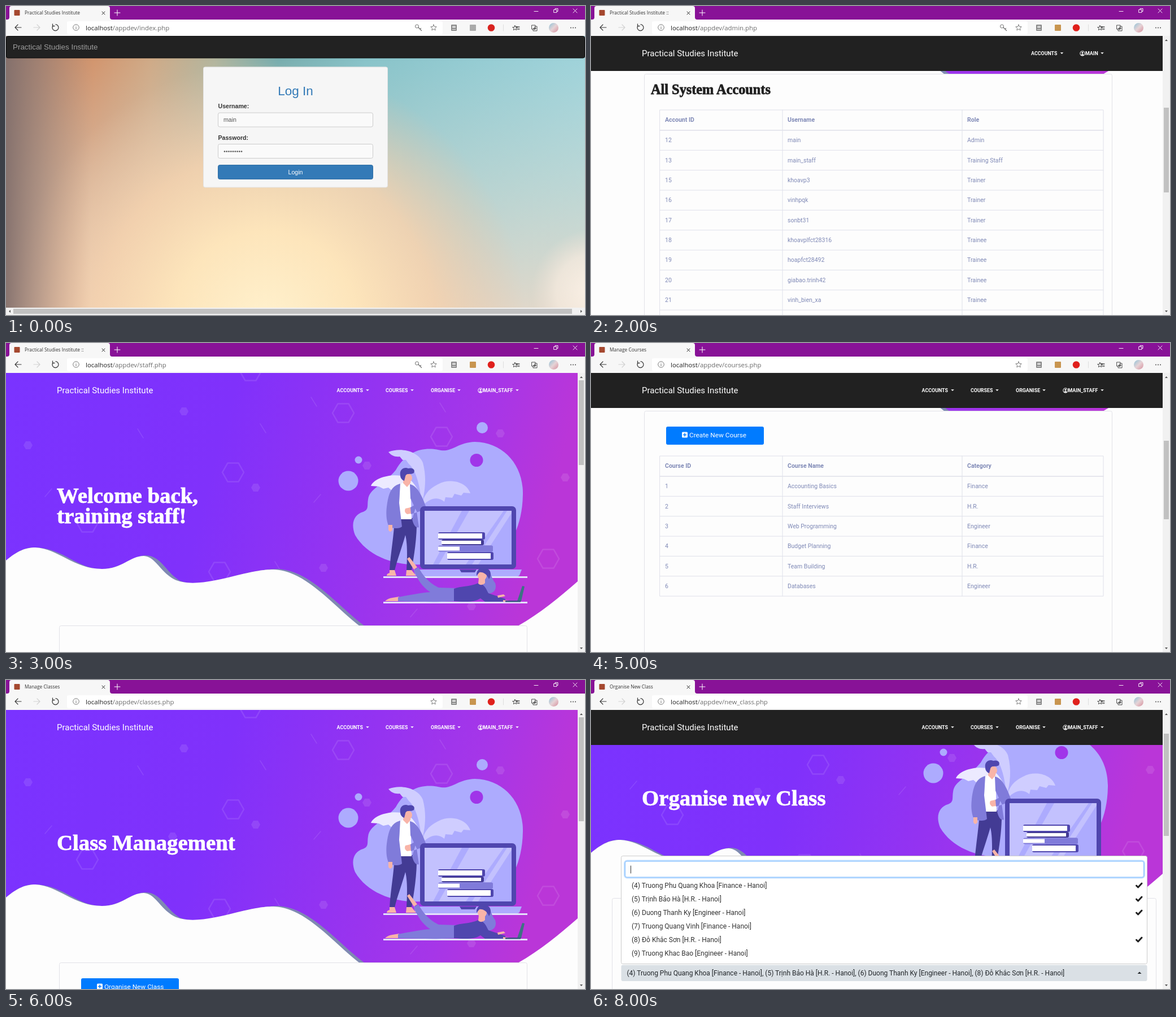
Animation of 1025x547 px, one loop 9000 ms. Source, as an HTML page:

```html
<!DOCTYPE html>
<html lang="en">
<head>
<meta charset="utf-8">
<title>Training portal tour</title>
<style>
  html, body { margin: 0; width: 100%; height: 100%; overflow: hidden; background: #fdfdfd; }
  svg { display: block; width: 100vw; height: 100vh; }
  text { white-space: pre; font-family: Roboto, sans-serif; }
  .ui { font-family: "Open Sans", "Noto Sans", sans-serif; }
  .arial { font-family: "Liberation Sans", Arial, sans-serif; }
  .serif { font-family: "Liberation Serif", serif; font-weight: 700; stroke-width: .8; }
  .bold { font-weight: 700; }
  .mid { text-anchor: middle; }
  .line { fill: none; stroke-linecap: round; stroke-linejoin: round; }
  .scene { opacity: 0; }
</style>
</head>
<body>
<svg id="stage" viewBox="0 0 1025 547" preserveAspectRatio="none"></svg>
<script>
const STEP = 1000;
const BRAND = 'Practical Studies Institute';

const rect = (x, y, w, h, fill, more = '') =>
  `<rect x="${x}" y="${y}" width="${w}" height="${h}" fill="${fill}" ${more}/>`;
const disc = (x, y, r, fill, more = '') => `<circle cx="${x}" cy="${y}" r="${r}" fill="${fill}" ${more}/>`;
const shape = (d, fill) => `<path d="${d}" fill="${fill}"/>`;
const line = (d, color, width = 1) => `<path class="line" d="${d}" stroke="${color}" stroke-width="${width}"/>`;
const text = (x, y, size, str, fill, cls = '') =>
  `<text x="${x}" y="${y}" font-size="${size}" fill="${fill}" class="${cls}">${str}</text>`;
const serif = (x, y, size, str, fill) =>
  `<text x="${x}" y="${y}" font-size="${size}" fill="${fill}" stroke="${fill}" class="serif">${str}</text>`;
const stops = list => list.map(([at, color, alpha = 1]) =>
  `<stop offset="${at}" stop-color="${color}" stop-opacity="${alpha}"/>`).join('');
const each = (list, fn) => list.map(fn).join('');

// Browser window
function chrome(title, url, { key = false, login = false } = {}) {
  const ink = '#3b3b3b', soft = '#707070';
  return rect(0, 0, 1025, 24, '#881297')
    + shape('M2 24Q6 24 6 20V4Q6 0 10 0H180Q184 0 184 4V20Q184 24 188 24Z', '#f7f7f7')
    + rect(14.5, 7, 10, 10, '#a5482f', 'rx="1"')
    + text(33, 15.3, 8.4, title, '#333', 'ui')
    + line('M170 10l5 5M175 10l-5 5', '#222')
    + line('M192 12h10M197 7v10', '#fff')
    + line('M935 9.5h7M970 6.5h5v5h-5zM972 6V4.500h5v5h-2M1004 5l7 7M1011 5l-7 7', '#fff', .9)
    + rect(0, 24, 1025, 29, '#f7f7f7')
    + rect(108, 27, 665, 23, '#fff', 'rx="3"')
    + line('M27 38H16M21 33l-5 5 5 5', ink, 1.2)
    + line('M49 38H60M55 33l5 5-5 5', '#d2d2d2', 1.2)
    + line('M83 35A5.500 5.500 0 1 0 88 32.700M82.500 32v3.500h3.500', ink, 1.3)
    + disc(124, 38, 5.3, 'none', `stroke="${soft}" stroke-width=".9"`)
    + line('M124 37.500v3M124 35.300v.1', soft)
    + `<text x="141" y="42.500" font-size="11.400" class="ui" fill="#222">localhost<tspan fill="#6c6c6c">/appdev/${url}</tspan></text>`
    + (key ? disc(727.5, 36, 3, 'none', `stroke="${soft}"`) + line('M730 38l5.500 5.500M733 41l1.500-1.500', soft, 1.3) : '')
    + line(star(757, 38.5, 5.5), soft, .9)
    + rect(788, 33, 10, 11, '#888', 'rx="1"') + rect(790, 35, 6, 4, '#cfcfcf') + line('M790 41.500h6', '#eee')
    + rect(821, 33, 11, 11, login ? '#aaa' : '#c8954f', 'rx="1"')
    + disc(859, 38.5, 6.3, login ? '#d9231f' : '#e0201c')
    + line('M880.500 33v11', '#ddd')
    + line(star(901, 39, 4.5), ink, .9) + line('M903 36.500h6M904 39h5M905 41.500h4', ink)
    + line('M931 34h6v7h-6zM933 41v3h7v-8h-3M936 37v5M933.500 39.500h5', ink, .9)
    + disc(969.5, 38.5, 8.5, 'url(#avatar)')
    + each([1000, 1004, 1008], x => disc(x, 38.5, .9, ink));
}

function star(x, y, r) {
  const points = Array.from({ length: 10 }, (_, i) => {
    const a = i * Math.PI / 5, d = i % 2 ? r * .45 : r;
    return `${(x + d * Math.sin(a)).toFixed(1)} ${(y - d * Math.cos(a)).toFixed(1)}`;
  });
  return `M${points.join('L')}Z`;
}

const scrollbar = (top, height) =>
  rect(1012, 53, 13, 494, '#f1f1f1') + rect(1014, top, 9, height, '#c1c1c1')
  + shape('M1016 62h5l-2.500-3zM1016 539h5l-2.500 3z', '#555');

// Log-in page
function loginScene() {
  const field = y => rect(375.5, y, 274, 25, '#fafafa', 'rx="3" stroke="#ccc"');
  return rect(0, 53, 1025, 494, 'url(#sky)')
    + rect(0, 92, 1025, 442, 'url(#haze)') + rect(0, 92, 1025, 442, 'url(#glow)')
    + rect(0, 92, 150, 442, 'url(#shade)') + rect(0, 92, 1025, 442, 'url(#flare)')
    + rect(.5, 53.5, 1024, 38.5, '#222', 'rx="3" stroke="#080808"')
    + text(12, 77, 13.4, BRAND, '#9d9d9d', 'arial')
    + rect(349.5, 108, 326, 213, '#f6f6f6', 'rx="3" stroke="#e3e3e3"')
    + text(512.5, 157.5, 22.5, 'Log In', '#337ab7', 'arial mid')
    + text(375.5, 181, 10.6, 'Username:', '#333', 'arial bold') + field(189)
    + text(385, 205, 10.6, 'main', '#555', 'arial')
    + text(375.5, 236.5, 10.6, 'Password:', '#333', 'arial bold') + field(244.5)
    + each([...Array(9).keys()], i => disc(387 + i * 3.75, 257.5, 1.35, '#555'))
    + rect(375.5, 281.5, 274, 25, '#337ab7', 'rx="3" stroke="#2e6da4"')
    + text(512.5, 297.7, 10.6, 'Login', '#fff', 'arial mid')
    + rect(0, 534, 1025, 13, '#f1f1f1') + rect(13, 536, 989, 9, '#c1c1c1')
    + shape('M8 538v5l-3-2.500zM1017 538v5l3-2.500z', '#555')
    + chrome(BRAND, 'index.php', { key: true, login: true });
}

// Hero banner
const hex = (x, y, r) => `M${x - r} ${y}l${r / 2} ${-r * .87}h${r}l${r / 2} ${r * .87}l${-r / 2} ${r * .87}h${-r}z`;

function decor() {
  const rings = [[597, 124], [771, 166], [402, 229], [144, 318], [960, 382], [378, 405], [433, 50]];
  const dots = [[315, 121], [39, 181], [875, 160], [990, 238], [442, 256], [295, 277], [562, 398], [824, 466], [639, 217]];
  const falling = [[545, 104], [773, 114], [238, 160], [455, 151], [481, 395]];
  const rising = [[75, 265], [551, 275], [722, 478]];
  return '<g opacity=".1">'
    + each(rings, ([x, y]) => line(hex(x, y, 19), '#fff', 2.5))
    + each(dots, ([x, y]) => shape(hex(x, y, 8), '#fff'))
    + each(falling, ([x, y]) => line(`M${x - 5} ${y - 8}l10 16`, '#fff', 1.5))
    + each(rising, ([x, y]) => line(`M${x - 6} ${y + 7}l12-14`, '#fff', 1.5))
    + '</g>';
}

const book = (x, y, w, h, cover) =>
  rect(x, y, w, h, cover, 'rx="3"') + rect(x, y + 2, w - 5, h - 4, '#fff');

function artwork() {
  const lilac = '#adabfe', mid = '#807bda', deep = '#4f46ae', navy = '#433b94', skin = '#f8b4a8', pale = '#cfcdff';
  const blob = 'M641 277C643 257 668 252 690 225C712 186 745 184 770 190C790 193 800 176 830 175C880 176 916 215 915 268'
    + 'C914 330 890 350 880 392H735C690 395 640 378 618 340C609 317 618 303 632 299C643 295 639 288 641 277Z';
  return shape(blob, lilac)
    + disc(843, 150, 10, lilac) + disc(624, 207, 6.5, lilac) + disc(606, 244, 17.5, lilac) + disc(833, 207.5, 11.5, '#a035e9')
    // leaves
    + shape('M677 193C700 184 730 192 738 212C745 238 742 262 736 285C733 255 727 226 713 214L708 207L702 207L697 201C688 202 682 199 677 193Z', pale)
    + shape('M646 253C652 237 690 228 712 239C725 249 735 268 736 285C715 262 700 256 684 262L677 256L668 258L660 254Z', '#eceaff')
    + shape('M822 266C815 245 785 239 765 250C746 259 738 272 736 290C748 276 763 270 776 281L778 273L790 274L794 267L806 270L810 265Z', pale)
    // standing figure
    + shape('M688 310H727C728 345 722 378 718 403H709C711 372 710 352 707 340C700 365 692 385 688 403H679C681 370 687 340 688 310Z', navy)
    + shape('M679 402h9l3 10h-17q0-4 5-5zM709 402h9l8 10h-18z', skin)
    + shape('M697 250L706 246L716 251L718 312H695Z', '#fff')
    + shape('M704 238h12v10l-6 7-7-7z', skin) + disc(711, 239, 8, skin)
    + shape('M698 234C696 223 706 219 712 222C720 220 725 224 722 230C716 234 709 229 707 236L705 244C700 242 698 238 698 234Z', deep)
    + shape('M698 249C682 253 677 266 674 290C672 308 675 318 677 323H684L683 327C691 329 698 328 701 325L696 283Z', mid)
    + shape('M715 250C728 252 737 272 743 289C740 297 726 300 717 303L714 292L727 285L719 312C722 325 727 328 731 326L727 298L716 275Z', mid)
    + shape('M677 322h7v9q-4 6-7 0zM707 293l9-2 1 11-7 1q-6-4-3-10z', skin)
    // laptop and books
    + rect(733, 289, 170, 111, deep, 'rx="7"') + rect(741, 297, 154, 95, lilac)
    + shape('M741 372V297H807L756 392H741ZM820 297H881L814 392H766ZM887 297H895V301L836 392H825Z', '#c3c1fe')
    + book(765, 335, 83, 13, deep) + book(771, 348, 75, 10, navy) + book(765, 358.5, 97, 11, mid)
    + rect(803, 358.500, 59, 11, mid, 'rx="3"') + book(781, 370, 82, 14, deep)
    + shape('M722 401H913L909 411Q908 413 904 413H731Q726 413 724 409Z', lilac)
    + shape('M803 401h30l-3 5h-24z', deep)
    + rect(668, 413, 255, 3, '#e4e1fb') + rect(668, 458, 255, 3, '#e4e1fb')
    // lying figure
    + shape('M710 382l4-3 14 18-6 4zM671 457q5-5 13-6l12-2v8z', skin)
    + shape('M722 402L730 397C738 412 750 426 766 433L797 434V457C770 459 730 458 694 457V450C715 446 735 442 751 441C737 432 728 418 722 402Z', mid)
    + shape('M850 400C860 405 858 415 866 425C870 437 862 446 848 443C840 432 846 415 844 404Z', mid)
    + shape('M793 435C805 430 820 432 836 425C848 427 850 436 854 443L884 453V458H848L840 452C828 460 810 458 793 457Z', deep)
    + shape('M837 416h11v9q-6 6-12 1z', skin) + disc(843, 412, 8, skin)
    + shape('M833 412C832 400 842 396 850 399C859 401 860 411 855 418C852 410 845 405 838 406Z', deep)
    + shape('M870 447l11-2 3 3-13 3zM880 455l11 1v2h-11z', skin)
    + shape('M905 457L914 430L918 431L912 457Z', '#3c7383') + rect(884, 456, 27, 2.5, '#3b4e82');
}

function hero() {
  const shadow = 'M0 385C20 368 35 361 54 362C105 365 125 400 170 400C205 400 222 376 248 376C275 377 283 406 308 421'
    + 'C335 431 370 421 410 411C440 404 460 400 482 400C540 403 588 467 635 501H0Z';
  const wave = 'M0 385C20 368 35 362 52 362C93 364 120 400 170 400C205 400 220 377 244 377C264 378 272 404 297 418'
    + 'C325 432 370 421 410 411C440 404 455 401 473 401C530 402 580 466 626 501H0Z';
  return rect(0, 53, 1012, 448, 'url(#violet)') + decor() + artwork()
    + shape(shadow, '#7f8ab2') + shape(wave, '#fdfdfd')
    + shape('M1012 422C980 450 945 479 906 501H1012Z', '#fdfdfd');
}

function navbar(staff, dark) {
  const label = (x, str, caretX) => text(x, 87, 8.9, str, '#fff', 'bold')
    + shape(`M${caretX - 2.8} 82.300h5.600l-2.800 2.800z`, '#fff');
  const person = x => disc(x, 84, 4.1, 'none', 'stroke="#fff" stroke-width="1"') + disc(x, 82.8, 1.6, '#fff')
    + shape(`M${x - 3} 86.500q3-3 6 0q-3 2.500-6 0z`, '#fff');
  return (dark ? rect(0, 53, 1012, 62, '#212121') : '')
    + text(90, 89.3, 15, BRAND, '#fff')
    + (staff
      ? label(585.5, 'ACCOUNTS', 640) + label(672, 'COURSES', 719) + label(752, 'ORGANISE', 802)
        + person(840) + label(844.5, 'MAIN_STAFF', 905)
      : label(779, 'ACCOUNTS', 833.5) + person(870) + label(875, 'MAIN', 905));
}

function portalScene({ tab, url, heading, body, over = '', scroll = 0, thumb, staff = true, key = false }) {
  const first = heading.length > 1 ? 283 : 301;
  return rect(0, 53, 1012, 494, '#fdfdfd')
    + `<g clip-path="url(#view)"><g transform="translate(0 ${-scroll})"><use href="#hero"/>`
    + each(heading, (str, i) => serif(90, first + i * 36, 38.8, str, '#fff'))
    + `${body}</g>${navbar(staff, scroll > 0)}${over}</g>`
    + scrollbar(...thumb) + chrome(tab, url, { key });
}

// Page bodies, in page coordinates
const card = (x, y, w) => rect(x + .5, y + .5, w, 900, '#fdfdfd', 'rx="3" stroke="#e2e2e8"');

function table(top, columns, rows) {
  const grey = '#7f89b6', rule = '#dfe0ea', left = 122, right = 907, pitch = 35.35;
  const inks = columns.map(([x]) => x + 9);
  const rowTop = i => top + 36 + i * pitch;
  const end = rowTop(rows.length);
  return line(`M${left} ${top}H${right}V${end}H${left}Z`, rule)
    + each(columns.slice(1), ([x]) => line(`M${x} ${top}V${end}`, rule))
    + line(`M${left} ${top + 36}H${right}`, rule, 1.6)
    + each(columns, ([, name], c) => text(inks[c], top + 21.3, 10.5, name, grey, 'bold'))
    + each(rows, (row, i) => (i ? line(`M${left} ${rowTop(i)}H${right}`, rule) : '')
      + each(row, (cell, c) => text(inks[c], rowTop(i) + 21.3, 10.5, cell, grey)));
}

const accounts = card(94, 500, 828) + serif(106, 536, 24.3, 'All System Accounts', '#212121')
  + table(564, [[122, 'Account ID'], [339, 'Username'], [657, 'Role']], [
    ['12', 'main', 'Admin'], ['13', 'main_staff', 'Training Staff'],
    ['15', 'khoavp3', 'Trainer'], ['16', 'vinhpqk', 'Trainer'], ['17', 'sonbt31', 'Trainer'],
    ['18', 'khoavplfct28316', 'Trainee'], ['19', 'hoapfct28492', 'Trainee'],
    ['20', 'giabao.trinh42', 'Trainee'], ['21', 'vinh_bien_xa', 'Trainee'], ['22', 'hoapk', 'Trainee']]);

const listPage = label => card(94, 500, 828)
  + rect(133, 528, 173, 32, '#007bff', 'rx="3"')
  + rect(161, 537.5, 10, 10, '#fff', 'rx="1.500"') + line('M163.500 542.500h5M166 540v5', '#007bff', 1.5)
  + text(174, 547, 11.8, label, '#fff');

const courses = listPage('Create New Course')
  + table(580, [[122, 'Course ID'], [339, 'Course Name'], [657, 'Category']], [
    ['1', 'Accounting Basics', 'Finance'], ['2', 'Staff Interviews', 'H.R.'], ['3', 'Web Programming', 'Engineer'],
    ['4', 'Budget Planning', 'Finance'], ['5', 'Team Building', 'H.R.'], ['6', 'Databases', 'Engineer']]);

const classes = listPage('Organise New Class');
const classForm = card(37, 465, 963);

// Trainee picker, in window coordinates
const trainees = ['(4) Truong Phu Quang Khoa [Finance - Hanoi]', '(5) Trịnh Bảo Hà [H.R. - Hanoi]',
  '(6) Duong Thanh Ky [Engineer - Hanoi]', '(7) Truong Quang Vinh [Finance - Hanoi]',
  '(8) Đỗ Khắc Sơn [H.R. - Hanoi]', '(9) Truong Khac Bao [Engineer - Hanoi]'];
const chosen = [0, 1, 2, 4];

const selectBar = (str, caret) => rect(53.5, 504.5, 931, 28.5, '#dae0e5', 'rx="3"')
  + text(63.5, 522.7, 12, str, '#212529') + shape(caret, '#212529');
const closedPicker = text(54, 496, 12, 'Trainees', '#212529')
  + selectBar('Nothing selected', 'M967.500 517h7l-3.500 3.500z');
const openPicker = rect(53.5, 311.5, 931, 191, '#fff', 'rx="3" stroke="#ccc"')
  + rect(60, 320.5, 919, 29, '#fff', 'rx="4" stroke="#bfdeff" stroke-width="4"')
  + rect(60.5, 321, 918, 28, '#fff', 'rx="3" stroke="#80bdff"')
  + line('M70.500 329v13', '#333')
  + each(trainees, (str, i) => text(72, 368 + i * 24, 12, str, '#333'))
  + each(chosen, i => line(`M965.500 ${364 + i * 24}l3 3 6.500-7`, '#212121', 3))
  + selectBar(chosen.map(i => trainees[i]).join(', '), 'M967.500 520h7l-3.500-3.500z');

const defs = `<defs>
  <linearGradient id="violet" x2="1" y2=".12">${stops([[0, '#7a33ff'], [.4, '#8031fb'], [.65, '#9433f1'], [.85, '#a636e8'], [1, '#ba36d8']])}</linearGradient>
  <linearGradient id="sky">${stops([[0, '#8c7770'], [.08, '#b08872'], [.15, '#d2956e'], [.25, '#cfaa87'], [.36, '#b3b59d'], [.47, '#78adae'], [.62, '#88c3c9'], [.82, '#95ccd3'], [1, '#a0d3da']])}</linearGradient>
  <linearGradient id="haze" x2="0" y2="1">${stops([[0, '#d9ddd6', 0], [.45, '#dfdcd0', .4], [1, '#ecd9c8', .85]])}</linearGradient>
  <radialGradient id="glow" gradientUnits="userSpaceOnUse" cx="460" cy="560" r="460">${stops([[0, '#fff1cd'], [.35, '#fde5bb'], [.65, '#f5d2ae', .85], [1, '#e8c3a4', 0]])}</radialGradient>
  <linearGradient id="shade">${stops([[0, '#84706c', .95], [.4, '#a08072', .6], [1, '#cf936f', 0]])}</linearGradient>
  <radialGradient id="flare" gradientUnits="userSpaceOnUse" cx="1040" cy="505" r="110">${stops([[0, '#fbf1e6'], [.6, '#f7ebdf', .7], [1, '#f0e2d6', 0]])}</radialGradient>
  <linearGradient id="avatar" x2="1" y2="1">${stops([[0, '#8fc3d8'], [.5, '#e6d3d6'], [1, '#d68f9d']])}</linearGradient>
  <clipPath id="view"><rect y="53" width="1012" height="494"/></clipPath>
  <g id="hero">${hero()}</g>
</defs>`;

const admin = { tab: BRAND + ' ::', url: 'admin.php', heading: ['Welcome back,', 'administrator!'], body: accounts, staff: false, key: true };
const coursePage = { tab: 'Manage Courses', url: 'courses.php', heading: ['Course', 'Management'], body: courses };
const newClass = { tab: 'Organise New Class', url: 'new_class.php', heading: ['Organise new Class'], body: classForm, scroll: 79, thumb: [95, 181] };

const scenes = [
  loginScene(),
  portalScene({ ...admin, thumb: [66, 150] }),
  portalScene({ ...admin, scroll: 380, thumb: [180, 150] }),
  portalScene({ ...admin, staff: true, url: 'staff.php', heading: ['Welcome back,', 'training staff!'], body: card(94, 500, 828), thumb: [66, 150] }),
  portalScene({ ...coursePage, thumb: [66, 139] }),
  portalScene({ ...coursePage, scroll: 380, thumb: [173, 139] }),
  portalScene({ tab: 'Manage Classes', url: 'classes.php', heading: ['Class Management'], body: classes, thumb: [66, 184] }),
  portalScene({ ...newClass, over: closedPicker }),
  portalScene({ ...newClass, over: openPicker }),
];

const stage = document.getElementById('stage');
stage.innerHTML = defs + each(scenes, s => `<g class="scene">${s}</g>`);

const loop = scenes.length * STEP;
stage.querySelectorAll('.scene').forEach((scene, i) => scene.animate([
  { opacity: 1, offset: 0, easing: 'step-end' },
  { opacity: 0, offset: 1 / scenes.length, easing: 'step-end' },
  { opacity: 0, offset: 1 },
], { duration: loop, iterations: Infinity, delay: i * STEP - loop }));
</script>
</body>
</html>
```
